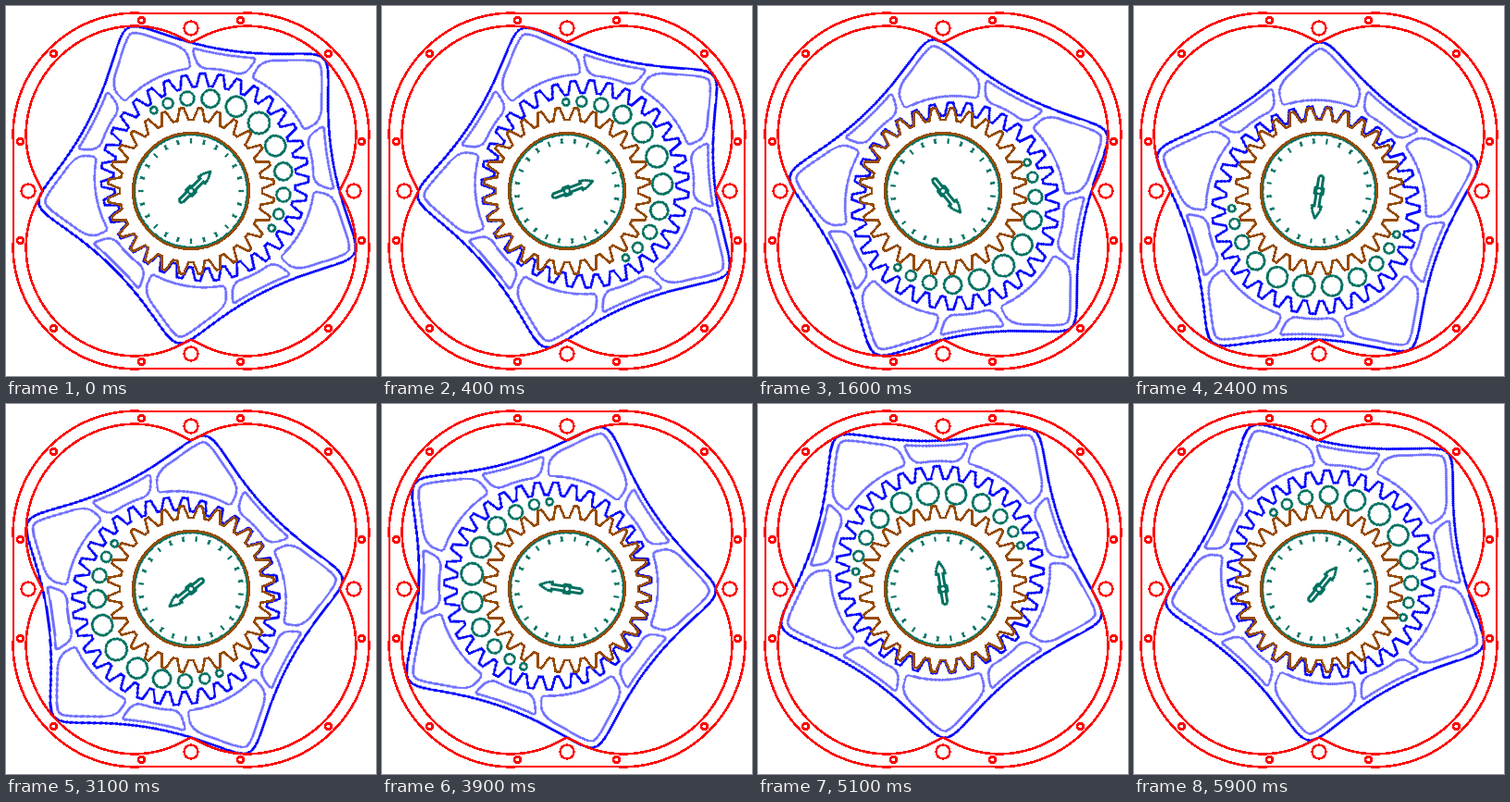
Recreate the animation shown at these times as an HTML page. Size 400x400 px, loop 6 s.

```html
<!DOCTYPE html>
<html lang="en">
<head>
<meta charset="utf-8">
<title>Five-sided rotary engine</title>
<style>
  html, body { margin: 0; width: 100%; height: 100%; overflow: hidden; background: #fff; }
  svg { display: block; width: 100%; height: 100%; fill: none; stroke-width: 2.6; stroke-linejoin: round; shape-rendering: crispEdges; }
  .shaft, .rotor { transform-origin: 0 0; animation: 6s steps(60) infinite; }
  .shaft { animation-name: turn; stroke: #007060; }
  .rotor { animation-name: counter; stroke: #7070ff; }
  .edge { stroke: #00f; }
  .fixed { stroke: #964b00; }
  .housing { stroke: #f00; }
  @keyframes turn { from { transform: rotate(-45deg); } to { transform: rotate(315deg); } }
  /* The rotor turns at a fifth of the shaft speed. */
  @keyframes counter { from { transform: rotate(0deg); } to { transform: rotate(-288deg); } }
</style>
</head>
<body>
<svg viewBox="0 0 400 400">
  <g transform="translate(200 200)">
    <g class="shaft">
      <g transform="translate(21 0)"><g class="rotor" id="rotor"></g></g>
      <g id="holes"></g>
    </g>
    <g class="fixed" id="pinion"></g>
    <g class="shaft" id="dial">
      <circle r="61"/>
      <path d="M-15 -2.3 L-5 -2.3 C-3 -6 3 -6 5 -2.3 L17 -2.3 L16.5 -5.3 Q24 -4 30 0 Q24 4 16.5 5.3 L17 2.3 L5 2.3 C3 6 -3 6 -5 2.3 L-15 2.3 Q-19 0 -15 -2.3 Z"/>
      <circle r="3.2"/>
    </g>
    <g class="fixed"><circle r="62.8"/></g>
    <g class="housing" id="housing"></g>
  </g>
</svg>
<script>
  const ECC = 21, RAD = Math.PI / 180;
  const byId = id => document.getElementById(id);
  const range = (from, to, n) => Array.from({ length: n + 1 }, (_, i) => from + (to - from) * i / n);
  const line = pts => pts.map(p => p[0].toFixed(2) + ' ' + p[1].toFixed(2)).join('L');
  const polar = (r, a) => [r * Math.cos(a), r * Math.sin(a)];

  function add(parent, tag, attrs) {
    const el = document.createElementNS('http://www.w3.org/2000/svg', tag);
    for (const key in attrs) el.setAttribute(key, attrs[key]);
    byId(parent).append(el);
  }
  const path = (parent, d, attrs) => add(parent, 'path', { d, ...attrs });
  const circle = (parent, cx, cy, r) => add(parent, 'circle', { cx, cy, r });

  // Point on a trochoid, moved outwards along its normal.
  function trochoid(R, e, k, deg, off = 0) {
    const a = deg * RAD;
    const dx = -R * Math.sin(a) - e * k * Math.sin(k * a);
    const dy = R * Math.cos(a) + e * k * Math.cos(k * a);
    const n = Math.hypot(dx, dy);
    return [
      R * Math.cos(a) + e * Math.cos(k * a) + off * dy / n,
      R * Math.sin(a) + e * Math.sin(k * a) - off * dx / n
    ];
  }
  const casing = (deg, off) => trochoid(170, -ECC, 5, deg, off);
  const apex = (deg, off) => trochoid(160.5, ECC, -4, deg, off);
  const flank = (deg, off) => trochoid(160.5, -ECC, -4, deg, off);

  // Gear with a gap at angle 0; widths are fractions of a tooth pitch.
  function gear(n, outer, inner, top, base) {
    const pts = [];
    for (let i = 0; i < n; i++) {
      for (const [r, u] of [[inner, -base], [outer, -top], [outer, top], [inner, base]]) {
        pts.push(polar(r, (i + 0.5 + u) / n * 2 * Math.PI));
      }
    }
    return 'M' + line(pts) + 'Z';
  }

  // Rotor
  const cornerPocket = 'M' + line(range(-22, 22, 44).map(a => apex(a, -7))) +
    'Q133 45.5 123 43L117 41.4Q111.5 40 113.7 35' +
    'A119 119 0 0 0 113.7 -35Q111.5 -40 117 -41.4L123 -43Q133 -45.5 ' +
    line([apex(-22, -7)]) + 'Z';
  const sidePocket = 'M' + line(range(-7, 7, 14).map(a => flank(a, -5.3))) +
    'Q137 35.5 131 33L124 29.5Q116.5 25.5 116.3 17' +
    'A117.5 117.5 0 0 0 116.3 -17Q116.5 -25.5 124 -29.5L131 -33Q137 -35.5 ' +
    line([flank(-7, -5.3)]) + 'Z';
  for (let i = 0; i < 5; i++) {
    path('rotor', cornerPocket, { transform: `rotate(${72 * i})` });
    path('rotor', sidePocket, { transform: `rotate(${72 * i + 36})` });
  }
  path('rotor', 'M' + line(range(0, 360, 360).map(a => apex(a))) + 'Z', { class: 'edge' });
  path('rotor', gear(35, 112, 98.5, 0.14, 0.38), { class: 'edge' });
  path('pinion', gear(28, 90, 77, 0.11, 0.36));

  // Holes fill the crescent between the two gears.
  for (const deg of [0, 16.8, 33, 47.3, 59.7, 69.7]) {
    const a = deg * RAD;
    const far = ECC * Math.cos(a) + Math.sqrt(98 ** 2 - (ECC * Math.sin(a)) ** 2);
    const [x, y] = polar((far + 89) / 2, a);
    const r = (far - 89) / 2 - 3.5;
    circle('holes', x, y, r);
    if (deg) circle('holes', x, -y, r);
  }

  for (let i = 0; i < 24; i++) {
    path('dial', 'M51.5 0H57', { transform: `rotate(${15 * i})` });
  }

  // Housing
  path('housing', 'M' + line(range(0, 360, 480).map(a => casing(a, 12))) + 'Z');
  const lobes = [0, 90, 180, 270].flatMap(q => range(q + 25, q + 65, 40));
  path('housing', 'M' + line(lobes.map(a => casing(a, 26))) + 'Z');
  for (let i = 0; i < 4; i++) {
    const spots = [[176, 0, 7.4], [184.5, 53.5, 3.3], [184.5, -53.5, 3.3], [148.5, 148.5, 3.3]];
    for (const [cx, cy, r] of spots) {
      add('housing', 'circle', { cx, cy, r, transform: `rotate(${90 * i})` });
    }
  }
</script>
</body>
</html>
```
